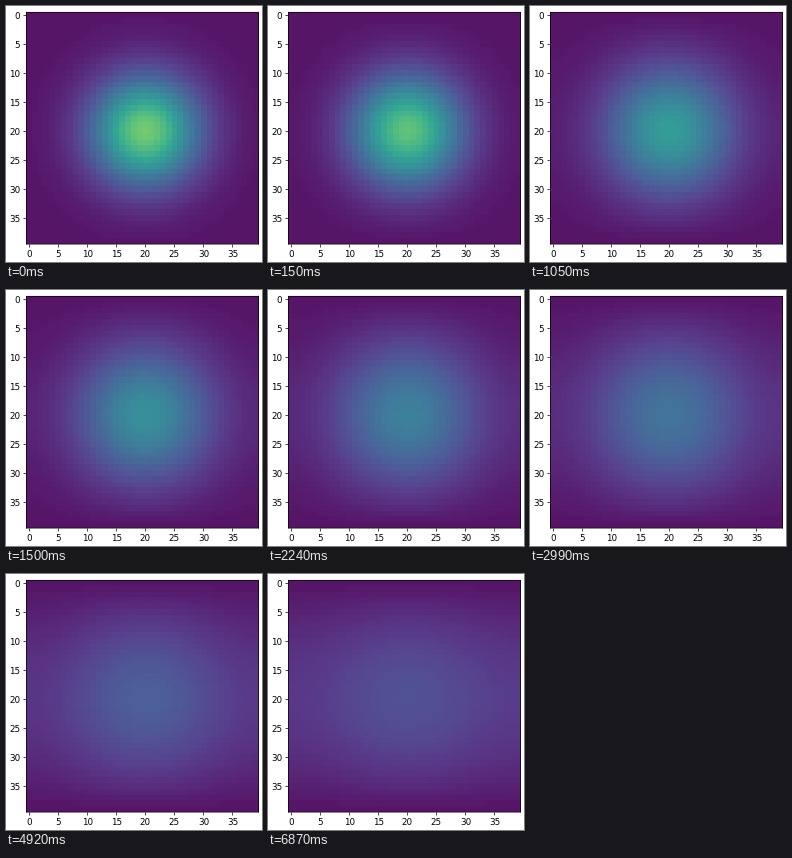
Write a matplotlib script that moves like this. It is 256 by 256 pixels and loops after 8000 ms.

```python
import numpy as np
import matplotlib.pyplot as plt
from matplotlib.animation import FuncAnimation

DPI = 72
STAGE = 256
CELLS = 40
FRAMES = 160
INTERVAL = 50
SUBSTEPS = 2
RATE = 0.22  # diffusion number per substep
PEAK = 0.77
VARIANCE = 45
LEFT, TOP, RIGHT, BOTTOM = 20.4, 6.3, 252.6, 238.1  # plot box in pixels
TINT = (0.88, 0.70, 1.0)  # shows through the translucent map


def clamp_edges(u):
    """Cold top and bottom rows, insulated left and right sides."""
    u[0] = u[-1] = 0
    return u


def diffuse(u):
    p = np.pad(u, 1, mode="edge")
    lap = p[:-2, 1:-1] + p[2:, 1:-1] + p[1:-1, :-2] + p[1:-1, 2:] - 4 * u
    return clamp_edges(u + RATE * lap)


def simulate():
    y, x = np.mgrid[:CELLS, :CELLS] - CELLS // 2
    u = clamp_edges(PEAK * np.exp(-(x**2 + y**2) / (2 * VARIANCE)))
    fields = []
    for _ in range(FRAMES):
        fields.append(u)
        for _ in range(SUBSTEPS):
            u = diffuse(u)
    return fields


fields = simulate()

fig = plt.figure(figsize=(STAGE / DPI, STAGE / DPI), dpi=DPI, facecolor="white")
ax = fig.add_axes([LEFT / STAGE, 1 - BOTTOM / STAGE,
                   (RIGHT - LEFT) / STAGE, (BOTTOM - TOP) / STAGE],
                  facecolor=TINT)
image = ax.imshow(fields[0], cmap="viridis", vmin=0, vmax=1, alpha=0.89,
                  interpolation="nearest", aspect="auto")
ax.set_xticks(range(0, CELLS, 5))
ax.set_yticks(range(0, CELLS, 5))
ax.tick_params(labelsize=8.72, length=3.05, pad=3.05, width=0.7)
for spine in ax.spines.values():
    spine.set_linewidth(0.7)
    spine.set_snap(False)


def update(i):
    image.set_data(fields[i])
    return [image]


anim = FuncAnimation(fig, update, frames=FRAMES, interval=INTERVAL,
                     repeat=True, repeat_delay=0, blit=False)
plt.show()
```
